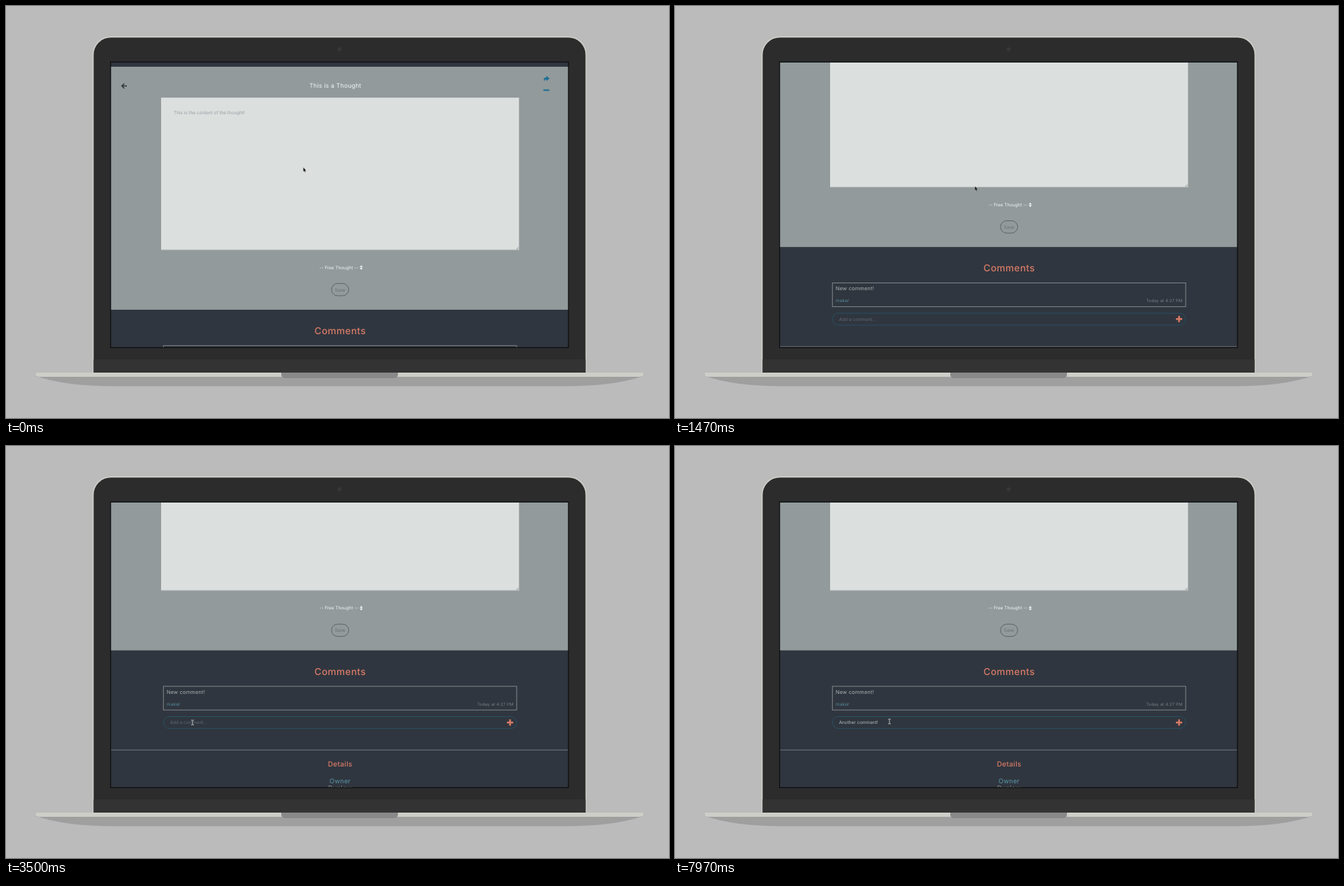
An HTML page that plays this animation: 949 px wide and 590 px high, repeating every 8000 ms.

```html
<!DOCTYPE html>
<html lang="en">
<head>
<meta charset="utf-8">
<title>Thought comments</title>
<style>
  html, body { margin: 0; width: 100%; height: 100%; overflow: hidden; background: #bbb; }
  svg { display: block; width: 949px; height: 590px; }
  text { font-family: Inter, sans-serif; font-size: 6.4px; text-rendering: geometricPrecision; white-space: pre; }
  .wide { letter-spacing: .03em; }
  .mid { text-anchor: middle; }
  .coral { fill: #d87b68; font-weight: 500; }
  .line { fill: none; stroke-width: 1; }
</style>
</head>
<body>
<svg viewBox="0 0 949 590">
  <defs>
    <clipPath id="screen"><rect x="150" y="80.5" width="655" height="408.5"/></clipPath>
  </defs>

  <!-- Laptop -->
  <path d="M123.8 525V70a26 26 0 0 1 26-26.500H805a26 26 0 0 1 26 26.500V525z" fill="#cdcec8"/>
  <path d="M125.500 525V70a24.500 24.500 0 0 1 24.500-24.800H805a24.500 24.500 0 0 1 24.500 24.800V525z" fill="#2c2c2c"/>
  <rect x="125.500" y="506" width="704" height="19" fill="#333"/>
  <circle cx="477.500" cy="62" r="3" fill="#373737"/>
  <path d="M43 530H912Q870 544.500 800 544.500H155Q85 544.500 43 530z" fill="#9f9f9f"/>
  <path d="M43 525H912V529.500L908 531H47L43 529.500z" fill="#cdcec8"/>
  <path d="M394 525H561V528a5 5 0 0 1-5 5H399a5 5 0 0 1-5-5z" fill="#898989"/>

  <!-- Page -->
  <g clip-path="url(#screen)">
    <rect x="149" y="80" width="657" height="410" fill="#929a9b"/>
    <g id="page">
      <rect x="149" y="60" width="657" height="27" fill="#30363f"/>
      <path d="M173 114.600H166M169.300 111.100L165.800 114.600L169.300 118.100" fill="none" stroke="#2f3338" stroke-width="1.400"/>
      <text class="wide mid" x="471.500" y="116.800" style="font-size:8.6px" fill="#f4f6f6">This is a Thought</text>
      <path d="M773.500 100L778 103.800L773.500 107.600V105.200Q770.500 105 770.600 108.300Q767.800 102.600 773.500 102.300z" fill="#1b6f93"/>
      <rect x="769" y="119.500" width="9" height="2" rx=".8" fill="#1b6f93"/>

      <rect x="222" y="131.300" width="512.500" height="218" fill="#dbdfde"/>
      <path d="M222 349.300H734.500V131.300" class="line" stroke="#aab0b0" stroke-width=".6"/>
      <path d="M730.500 348.500L733.500 345.500M732.300 348.500L733.500 347.300" class="line" stroke="#959b9b" stroke-width=".6"/>
      <text x="240" y="155.300" fill="#969da1">This is the content of the thought!</text>

      <text x="448.500" y="376.800" fill="#f4f6f6">-- Free Thought --</text>
      <path d="M506.300 374.100L508.500 371.300L510.700 374.100zM506.300 375.100L508.500 377.900L510.700 375.100z" fill="#f4f6f6"/>
      <rect class="line" x="465.900" y="397.400" width="24.600" height="17.600" rx="8.800" stroke="#5b6366"/>
      <text class="mid" x="478.200" y="408.700" fill="#687073">Save</text>

      <rect x="149" y="435" width="657" height="240" fill="#30363f"/>
      <text class="wide mid coral" x="478.400" y="470" style="font-size:13.6px">Comments</text>
      <rect class="line" x="225.300" y="486.400" width="505.700" height="34" stroke="#81878b"/>
      <text class="wide" x="230" y="497.300" style="font-size:7.35px" fill="#a9b2b3">New comment!</text>
      <text class="wide" x="230" y="514" style="font-size:6.4px" fill="#548d9c">maker</text>
      <text class="wide" x="726.500" y="514" text-anchor="end" style="font-size:5.95px" fill="#798186">Today at 4:27 PM</text>

      <rect class="line" x="225.300" y="529.800" width="505.700" height="17" rx="8.500" stroke="#265063"/>
      <text id="entry" x="234.700" y="540.500"></text>
      <rect id="caret" y="534" width=".8" height="8.200" fill="#cbd0d1"/>
      <path d="M717 538.200H726M721.500 533.700V542.700" stroke="#d87b68" stroke-width="2.500"/>

      <path d="M149 577.600H806" class="line" stroke="#70767c"/>
      <text class="wide mid coral" x="478.200" y="601.100" style="font-size:10.1px">Details</text>
      <text class="wide mid" x="478.200" y="625.100" style="font-size:9.2px" fill="#5797a6">Owner</text>
      <text class="wide mid" x="478.200" y="635.800" style="font-size:9.2px" fill="#8d9698">Dunlow</text>
    </g>
    <path id="arrow" d="M0 0V6.300L1.400 5.100L2.400 7.300L3.500 6.800L2.500 4.700H4.300z" fill="#111" stroke="#ddd" stroke-width=".3"/>
    <path id="beam" d="M-2-3.600Q0-3.600 0-2.500Q0-3.600 2-3.600M0-2.500V2.500M-2 3.600Q0 3.600 0 2.500Q0 3.600 2 3.600" fill="none" stroke="#c3c8ca" stroke-width=".9"/>
  </g>
  <rect x="149.700" y="80.200" width="655.400" height="409" fill="none" stroke="#0c0e10" stroke-width="1.300"/>
</svg>
<script>
const LOOP = 8000;
const MESSAGE = "Another comment!";
const FIRST_KEY = 4600, SECOND_KEY = 4865, KEY_GAP = 166;
const BLINK = 500;

// Keys are [time, value, ...].
const scrollKeys = [[0, 0], [470, 22.7], [970, 43.7], [1300, 75], [1730, 112.3], [2050, 133], [2350, 142.3]];
const pointerKeys = [
  [0, 425.5, 231], [470, 427, 238.5], [970, 428.700, 244.500], [1730, 429.500, 265],
  [1900, 420, 276], [2300, 310, 376], [2570, 283, 395.500], [2700, 283, 395.500], [3150, 267, 396],
  [7840, 267, 396], [7970, 307, 394.500]
];

const byId = id => document.getElementById(id);
const [page, entry, caret, arrow, beam] = ["page", "entry", "caret", "arrow", "beam"].map(byId);
const show = (node, on) => node.setAttribute("visibility", on ? "visible" : "hidden");
const move = (node, x, y) => node.setAttribute("transform", `translate(${x} ${y})`);

function sample(keys, t) {
  const next = keys.findIndex(key => key[0] > t);
  if (next < 0) return keys[keys.length - 1].slice(1);
  const a = keys[next - 1], b = keys[next];
  const p = (t - a[0]) / (b[0] - a[0]);
  return a.slice(1).map((v, i) => v + (b[i + 1] - v) * p);
}

function typedCount(t) {
  if (t < FIRST_KEY) return 0;
  if (t < SECOND_KEY) return 1;
  return Math.min(MESSAGE.length, 2 + Math.floor((t - SECOND_KEY) / KEY_GAP));
}

function caretOn(t) {
  if (t < FIRST_KEY) return t >= 3000 && Math.floor((t - 3000) / BLINK) % 2 === 0;
  return t < 7730;
}

function draw(t) {
  const [scroll] = sample(scrollKeys, t);
  move(page, 0, -scroll);

  const count = typedCount(t);
  entry.textContent = count ? MESSAGE.slice(0, count) : "Add a comment...";
  entry.setAttribute("fill", count ? "#b8c0c0" : "#626a70");
  caret.setAttribute("x", 234.700 + (count ? entry.getComputedTextLength() : 0));
  show(caret, caretOn(t));

  const [x, y] = sample(pointerKeys, t);
  const overInput = t >= 2500;
  move(arrow, x, y);
  move(beam, x, y);
  show(arrow, !overInput);
  show(beam, overInput && (t < FIRST_KEY || t >= 7860));
}

function tick() {
  draw(performance.now() % LOOP);
  requestAnimationFrame(tick);
}
tick();
</script>
</body>
</html>
```
